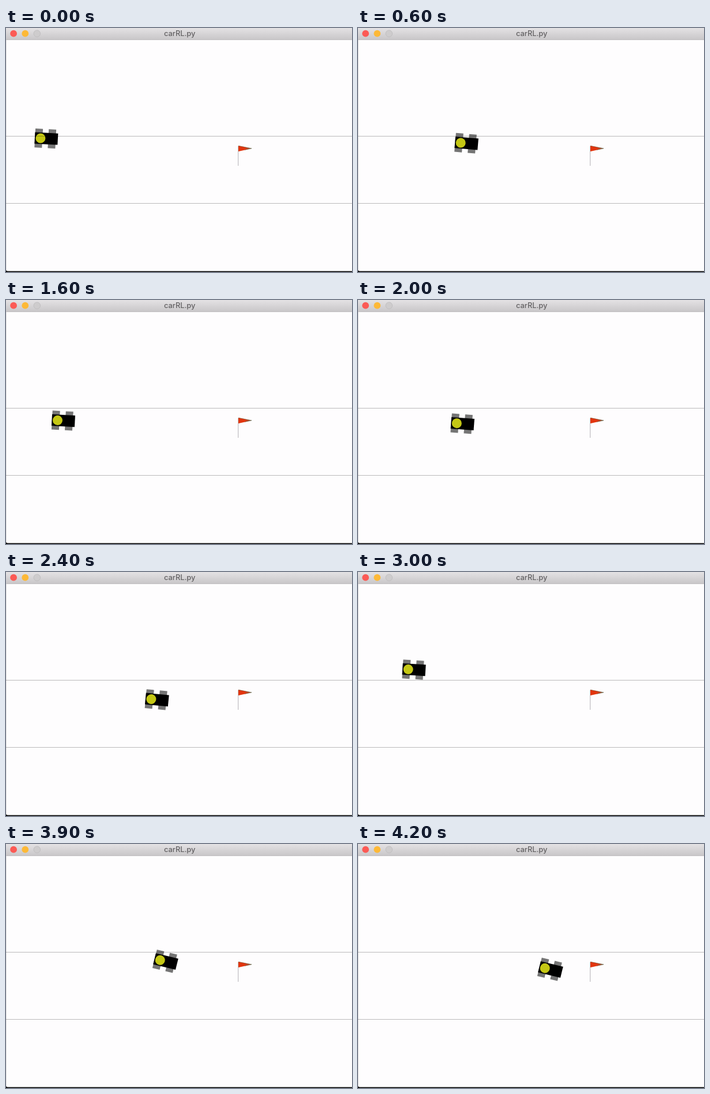
An HTML page that plays this animation: 600x425 px, repeating every 4300 ms.

```html
<!DOCTYPE html>
<html lang="en">
<head>
<meta charset="utf-8">
<title>carRL.py</title>
<style>
html, body { margin: 0; width: 100%; height: 100%; overflow: hidden; background: #000; }
svg { display: block; width: 600px; height: 425px; }
text { font: 500 12.8px Inter, Roboto, sans-serif; fill: #626062; text-anchor: middle; }
</style>
</head>
<body>
<svg viewBox="0 0 600 425">
  <defs>
    <linearGradient id="bar" x2="0" y2="1">
      <stop offset="0" stop-color="#e4e2e4"/>
      <stop offset="1" stop-color="#c8c6c8"/>
    </linearGradient>
    <linearGradient id="cloth">
      <stop offset=".45" stop-color="#e2350f"/>
      <stop offset="1" stop-color="#8a6a50"/>
    </linearGradient>
  </defs>

  <path d="M0 0H600V423.6H3Q0 423.6 0 420Z" fill="#fefdfe"/>
  <path d="M.25 21V421" stroke="#aaa" stroke-width=".5"/>

  <rect width="600" height="20.5" fill="url(#bar)"/>
  <path d="M0 20.5H600" stroke="#c2c0c2"/>
  <circle cx="13.1" cy="9.7" r="5.9" fill="#fb5a55"/>
  <circle cx="33.3" cy="9.7" r="5.9" fill="#fdb937"/>
  <circle cx="53.8" cy="9.7" r="5.8" fill="#cecccd" stroke="#bcbabc" stroke-width=".8"/>
  <text x="301.2" y="14.2">carRL.py</text>

  <g id="car">
    <path d="M-9.7 -16.5h13v33h-13zM13.4 -16.5h13v33h-13z" fill="#757575"/>
    <rect x="-10" y="-10" width="40" height="20"/>
    <circle r="8.5" fill="#c4c714"/>
  </g>

  <path d="M0 188.5H600M0 305.5H600" stroke="#000" stroke-opacity=".27"/>

  <g transform="translate(0 -.5)">
    <path d="M402.7 206V240.5" stroke="#b2b0b5"/>
    <path d="M403 205.6L426.5 210.3L403 215.4Z" fill="url(#cloth)"/>
    <path d="M403 205.8L426 210.3L414 212.9" fill="none" stroke="#4d5a3c" stroke-opacity=".55" stroke-width=".9"/>
  </g>
</svg>
<script>
const LOOP = 4300, STEP = 100;
const DRAG = 0.25;       // speed lost per degree of heading
const MAX_TILT = 13.8;

// Each run: start time, start point, heading, turn and speed per step, late start in steps
const runs = [
  { at: 0, x: 59.9, y: 192, tilt: 3.1, turn: 0.29, pace: 21.4, lag: 0.2 },
  { at: 1400, x: 56.4, y: 208, tilt: 2.6, turn: 0.29, pace: 21.4, lag: 0.4 },
  { at: 2800, x: 56.4, y: 169, tilt: -0.6, turn: 2.1, pace: 23, lag: 0.65 }
];

const car = document.getElementById('car');

// Drive step by step from the start of the current run
function pose(t) {
  const run = runs.findLast(r => r.at <= t);
  const steps = Math.floor((t - run.at) / STEP);
  let { x, y, tilt } = run;
  for (let i = 0; i < steps; i++) {
    const move = (run.pace - DRAG * tilt) * (i ? 1 : 1 - run.lag);
    const angle = tilt * Math.PI / 180;
    x += move * Math.cos(angle);
    y += move * Math.sin(angle);
    tilt = Math.min(MAX_TILT, tilt + run.turn);
  }
  return { x, y, tilt };
}

function draw(ms) {
  const { x, y, tilt } = pose(ms % LOOP);
  car.setAttribute('transform', `translate(${x} ${y}) rotate(${tilt})`);
}

let start;
function tick(now) {
  start ??= now;
  draw(now - start);
  requestAnimationFrame(tick);
}
draw(0);
requestAnimationFrame(tick);
</script>
</body>
</html>
```
